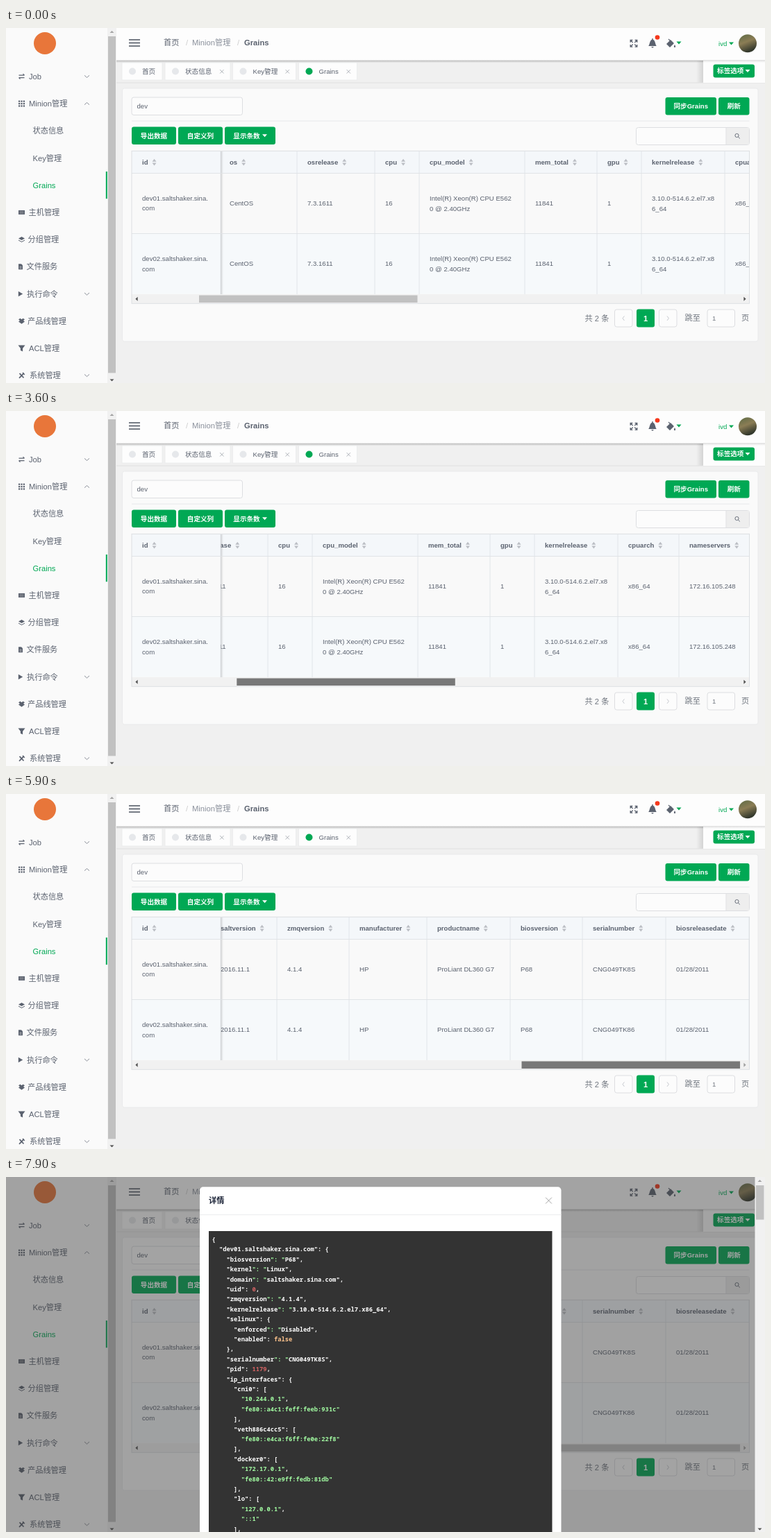
These frames come from a looping animation (1093x512 px, 8 s). An HTML page:

```html
<!DOCTYPE html>
<html lang="zh-CN">
<head>
<meta charset="utf-8">
<title>Grains</title>
<style>
html, body { margin: 0; width: 100%; height: 100%; overflow: hidden; background: #f0f0f0; }
svg { display: block; width: 1093px; height: 512px; }
text { font-family: "Liberation Sans", "Noto Sans CJK SC", "Noto Sans CJK", sans-serif; white-space: pre; }
.mono { font-family: "Noto Sans Mono", "DejaVu Sans Mono", monospace; font-size: 8.78px; font-weight: 600; }
</style>
</head>
<body>
<svg id="stage" viewBox="0 0 1093 512" xmlns="http://www.w3.org/2000/svg"></svg>
<script>
const GREEN = '#00a854', INK = '#5b626f', LINE = '#dddee1', DIM = '#bbbec4';
const LOOP = 8000, STEP = 100;
const stage = document.getElementById('stage');

const rect = (x, y, w, h, fill, more = '') =>
  `<rect x="${x}" y="${y}" width="${w}" height="${h}" fill="${fill}" ${more}/>`;
const disc = (x, y, r, fill) => `<circle cx="${x}" cy="${y}" r="${r}" fill="${fill}"/>`;
const fill = (d, color) => `<path d="${d}" fill="${color}"/>`;
const line = (d, color, w = 1) => `<path d="${d}" fill="none" stroke="${color}" stroke-width="${w}"/>`;
// y is the middle of the line of text
const text = (x, y, s, size = 9.6, color = INK, more = '') =>
  `<text x="${x}" y="${y + size * 0.36}" font-size="${size}" fill="${color}" ${more}>${s}</text>`;
const group = (body, more = '') => `<g ${more}>${body}</g>`;
const at = (x, y, body) => group(body, `transform="translate(${x} ${y})"`);
const cross = (x, y, r, color) =>
  line(`M${x - r} ${y - r}l${2 * r} ${2 * r}m0 ${-2 * r}l${-2 * r} ${2 * r}`, color, 0.9);
const caret = (x, y, color) => fill(`M${x - 3.5} ${y - 2}h7l-3.5 4z`, color);
const framed = (x, y, w, h, color = '#fcfcfc') => rect(x, y, w, h, color, `rx="3" stroke="${LINE}"`);

function button(x, y, w, h, label, drop) {
  const mid = x + w / 2 - (drop ? 5 : 0);
  return rect(x, y, w, h, GREEN, 'rx="3"') +
    text(mid, y + h / 2, label, 9.6, '#fff', 'text-anchor="middle" font-weight="600"') +
    (drop ? caret(x + w - 16 + drop, y + h / 2, '#fff') : '');
}

function arrow(x, y, dir, color = '#505050') {
  const turn = { up: 0, right: 90, down: 180, left: 270 }[dir];
  return `<path d="M-3 1.6h6l-3-3.2z" fill="${color}" transform="translate(${x} ${y}) rotate(${turn})"/>`;
}

// ---- sidebar ----
const icons = {
  job: line('M-4-1.8h8m-2-2l2 2M4 1.8h-8m2 2l-2-2', INK, 1.2),
  grid: [-3.4, 0, 3.4].map(x => [-3.4, 0, 3.4].map(y => rect(x - 1.1, y - 1.1, 2.2, 2.2, INK)).join('')).join(''),
  host: rect(-4.5, -3, 9, 6, INK) + line('M-3-1h6M-3 1h6', '#aaa', 0.7),
  stack: fill('M-4.5-1.5L0-4 4.5-1.5 0 1zM-4.5 .5L0 3 4.5 .5V1.4L0 4-4.5 1.4z', INK),
  file: fill('M-3-4h4l2 2v6h-6z', INK) + line('M-1.5 0h3M-1.5 2h3', '#ddd', 0.7),
  play: fill('M-3.2-3.8L3.2 0l-6.4 3.8z', INK),
  box: fill('M-4.5-2.5L-2-4 0-2.5 2-4 4.5-2.5 2.5-.8 4.5 .8 0 4-4.5 .8-2.5-.8z', INK),
  funnel: fill('M-5-4.5H5L1.6 0v4.5L-1.6 3V0z', INK),
  tools: line('M-3.5 3.8L3.2-3.2M-3-3l6 6.4', INK, 1.7) + line('M1.5-4l2.8 2.8', INK, 1.4)
};
const menu = [
  ['job', 'Job', 33, 'down'], ['grid', 'Minion管理', 33, 'up'],
  ['', '状态信息', 38.5], ['', 'Key管理', 38.5], ['', 'Grains', 38.5],
  ['host', '主机管理', 32.5], ['stack', '分组管理', 31.5], ['file', '文件服务', 29.5],
  ['play', '执行命令', 30, 'down'], ['box', '产品线管理', 31], ['funnel', 'ACL管理', 33],
  ['tools', '系统管理', 34, 'down']
];

function sidebar() {
  let s = rect(0, 0, 146, 512, '#fafafa') + disc(56, 22, 16, '#e8763a');
  menu.forEach(([icon, label, x, fold], i) => {
    const y = 69.9 + 39.2 * i;
    if (icon) s += at(icon === 'play' || icon === 'file' ? 21 : 22.5, y, icons[icon]);
    s += text(x, y, label, 11.2, i === 4 ? GREEN : INK);
    if (fold) {
      const d = fold === 'down' ? 1.6 : -1.6;
      s += line(`M113 ${y - d}l3.5 ${2 * d}l3.5 ${-2 * d}`, '#7d838d', 0.9);
    }
  });
  return s + rect(143.8, 207, 2, 39.2, GREEN) + rect(146, 0, 13, 512, '#f1f1f1') +
    rect(147, 12, 11, 485.5, '#c1c1c1') + arrow(152.5, 5.5, 'up', '#a3a3a3') + arrow(152.5, 508, 'down');
}

// ---- top bar and tabs ----
function header() {
  const corner = (a, b) => `M${a * 1.2} ${b * 1.2}L${a * 4} ${b * 4}M${a * 1.6} ${b * 4.8}H${a * 4.8}V${b * 1.6}`;
  const expand = [[-1, -1], [1, -1], [-1, 1], [1, 1]].map(p => corner(...p)).join('');
  return rect(159, 46, 934, 4, 'url(#drop)') + rect(159, 0, 934, 46.5, '#fdfdfd') +
    line('M177 17h16M177 21.5h16M177 26h16', '#4a515e', 1.5) +
    text(227, 21, '首页', 11.2) + text(259, 21, '/', 11.2, '#ccc') +
    text(268, 21, 'Minion管理', 11.2, '#8a909b') + text(333, 21, '/', 11.2, '#ccc') +
    text(343, 21, 'Grains', 11.2, INK, 'font-weight="700"') +
    at(904, 22.3, line(expand, INK, 1.3)) +
    at(931, 22, fill('M-6 4C-3.5 2-4.5-5 0-5.6 4.5-5 3.5 2 6 4zM-1.8 5h3.6Q0 8-1.8 5zM-.7-7h1.4v2h-1.4z', INK)) +
    disc(938, 13.5, 3.3, '#f5381c') +
    at(957, 22, fill('M-6 1L0-5 5 0-1 6zM6 2q2.4 4 0 4t0-4z', INK) + line('M-3-6l4 4', INK, 1.1)) +
    caret(969, 21.5, GREEN) + text(1026, 22.5, 'ivd', 9.6, GREEN) + caret(1044.5, 22.5, GREEN) +
    disc(1068, 22.3, 13, 'url(#photo)');
}

function tabs() {
  const list = [['首页', 167, 58], ['状态信息', 229, 94], ['Key管理', 326.5, 91], ['Grains', 421.5, 84]];
  let s = rect(159, 47, 934, 32, '#f0f0f0') + rect(159, 46.5, 934, 4, 'url(#drop)') + rect(159, 78.5, 934, 1, '#e2e2e2');
  list.forEach(([label, x, w], i) => {
    s += rect(x, 50, w, 25, '#fdfdfd', 'stroke="#e9eaec" stroke-width=".8"') +
      disc(x + 15, 62.5, 5, i === 3 ? GREEN : '#e6e8eb') + text(x + 29, 62.8, label);
    if (i) s += cross(x + w - 12.2, 62.8, 2.7, '#a9adb4');
  });
  return s + rect(994, 47, 10, 31.5, 'url(#side)') + rect(1004, 47, 89, 32, '#fdfdfd') +
    button(1018.5, 52.5, 59.5, 19, '标签选项', 6);
}

// ---- card ----
function card() {
  return rect(167.5, 87, 915.5, 365, '#fafafa', 'rx="3" stroke="#e6e7e9" stroke-width=".8"') +
    framed(181, 100, 159.5, 25.5) + text(188.5, 113, 'dev') +
    button(949.5, 100, 73.5, 25.5, '同步Grains') + button(1026, 100, 44.5, 25.5, '刷新') +
    rect(181, 133.6, 889.5, 0.9, '#e6e7ea') +
    button(181, 142.5, 64, 25.5, '导出数据') + button(248, 142.5, 64, 25.5, '自定义列') +
    button(315, 142.5, 73, 25.5, '显示条数', 0.5) +
    framed(907.5, 143.5, 163, 25) + rect(1037, 144, 33, 24, '#eee') + rect(1036.5, 144, 0.8, 24, LINE) +
    `<circle cx="1052.5" cy="155" r="2.6" fill="none" stroke="${INK}" stroke-width=".9"/>` +
    line('M1054.4 157l2.4 2.4', INK, 1);
}

function pager() {
  const nav = (x, d) => framed(x, 406, 25.5, 25) +
    line(`M${x + 12.7 + d} 415.5l${-2 * d} 3.2l${2 * d} 3.2`, '#c5c8ce');
  return text(833.5, 419, '共 2 条', 11.2, '#70767f') + nav(876.5, 1.2) + nav(940.5, -1.2) +
    rect(908, 405.5, 26, 26, GREEN, 'rx="3"') +
    text(921, 418.7, '1', 11.2, '#fff', 'text-anchor="middle" font-weight="700"') +
    text(977.5, 418, '跳至', 11.2, '#70767f') + framed(1010, 406, 39.5, 25) +
    text(1017, 418.7, '1', 9.6, '#70767f') + text(1059, 418, '页', 11.2, '#70767f');
}

// ---- table ----
const locale = 'defaultencoding : UTF-8|defaultlanguage : en_US|detectedencoding : UTF-8';
const columns = [
  ['os', 112, 'CentOS'], ['osrelease', 112, '7.3.1611'], ['cpu', 64, '16'],
  ['cpu_model', 152, 'Intel(R) Xeon(R) CPU E562|0 @ 2.40GHz'], ['mem_total', 104, '11841'], ['gpu', 64, '1'],
  ['kernelrelease', 120, '3.10.0-514.6.2.el7.x8|6_64'], ['cpuarch', 88, 'x86_64'],
  ['nameservers', 104, '172.16.105.248'], ['selinux', 116, 'enabled : false|enforced : Disabled'],
  ['locale_info', 152, locale], ['pythonversion', 112, '2.7.5.final.0'], ['saltversion', 96, '2016.11.1'],
  ['zmqversion', 104, '4.1.4'], ['manufacturer', 112, 'HP'], ['productname', 120, 'ProLiant DL360 G7'],
  ['biosversion', 104, 'P68'], ['serialnumber', 120, 'CNG049TK8S', 'CNG049TK86'], ['biosreleasedate', 120, '01/28/2011']
];

const cell = (x, y, value) => {
  const rows = value.split('|');
  return rows.map((s, i) => text(x, y + (i - (rows.length - 1) / 2) * 14.4, s)).join('');
};
const head = (x, label) => text(x, 193.6, label, 9.6, INK, 'font-weight="700" class="head"');

function table() {
  let x = 307, cells = '';
  for (const [label, w, a, b = a] of columns) {
    cells += head(x + 15, label) + cell(x + 15, 253, a) + cell(x + 15, 340, b);
    x += w;
    cells += rect(x - 0.4, 178, 0.9, 206, '#dfe3e8');
  }
  const fixed = head(196, 'id') + cell(196, 252.8, 'dev01.saltshaker.sina.|com') + cell(196, 340, 'dev02.saltshaker.sina.|com');
  return rect(181, 177, 889.5, 207, '#fafafa') + rect(181, 177.5, 889.5, 32, '#f4f7fa') +
    rect(181, 209.5, 889.5, 87, '#f9f9f9', 'id="row"') + rect(181, 296.5, 889.5, 87, '#f6f9fb') +
    group(group(cells, 'id="cells"'), 'clip-path="url(#view)"') + fixed +
    rect(309, 178, 4, 206, 'url(#edge)') + rect(308.8, 178, 0.9, 206, '#d3d6da') +
    [209, 296].map(y => rect(181, y, 889.5, 0.9, '#dfe2e6')).join('') +
    rect(181, 384, 889.5, 13, '#f1f1f1') + rect(278, 385.5, 314.5, 10.5, '#c1c1c1', 'id="thumb"') +
    arrow(188, 390.8, 'left') + group(arrow(1064, 390.8, 'right'), 'id="next"') +
    rect(181, 177.3, 889.5, 220, 'none', 'stroke="#d9dce0" stroke-width=".9"');
}

// ---- dialog ----
const json = `{
  "dev01.saltshaker.sina.com": {
    "biosversion": "P68",
    "kernel": "Linux",
    "domain": "saltshaker.sina.com",
    "uid": 0,
    "zmqversion": "4.1.4",
    "kernelrelease": "3.10.0-514.6.2.el7.x86_64",
    "selinux": {
      "enforced": "Disabled",
      "enabled": false
    },
    "serialnumber": "CNG049TK8S",
    "pid": 1179,
    "ip_interfaces": {
      "cni0": [
        "10.244.0.1",
        "fe80::a4c1:feff:feeb:931c"
      ],
      "veth886c4cc5": [
        "fe80::e4ca:f6ff:fe0e:22f8"
      ],
      "docker0": [
        "172.17.0.1",
        "fe80::42:e9ff:fedb:81db"
      ],
      "lo": [
        "127.0.0.1",
        "::1"
      ],`;
const paint = s => s.replace(/"[^"]*"(?!:)|\b\d+(?=,$)|false/g, m => {
  const color = m[0] === '"' ? '#a2fca2' : m === 'false' ? '#fcc28c' : '#d36363';
  return `<tspan fill="${color}">${m}</tspan>`;
});

function dialog() {
  const code = json.split('\n').map((s, i) => {
    const body = s.trimStart();
    return `<text class="mono" x="${296.5 + (s.length - body.length) * 5.27}" y="${93 + i * 14.4}" fill="#fff">${paint(body)}</text>`;
  }).join('');
  return rect(279, 14.3, 520.5, 5230, '#fff', 'rx="5"') + rect(279, 54, 520.5, 0.9, '#e9eaec') +
    text(292, 34, '详情', 11.2, '#1c2438', 'font-weight="700"') + cross(781.5, 34, 4.4, '#999') +
    rect(292, 78, 494.5, 5150, '#333') + code;
}

const pageBar = rect(1078.5, 0, 14.5, 512, '#f1f1f1') + rect(1080, 12, 11.5, 49.5, '#c1c1c1') +
  arrow(1085.5, 5.5, 'up', '#a3a3a3') + arrow(1085.5, 508, 'down');

const fade = (id, dir, a, b) => `<linearGradient id="${id}" x2="${dir === 'x' ? 1 : 0}" y2="${dir === 'x' ? 0 : 1}">
  <stop stop-color="#000" stop-opacity="${a}"/><stop offset="1" stop-color="#000" stop-opacity="${b}"/></linearGradient>`;

stage.innerHTML = `<defs>${fade('drop', 'y', 0.13, 0)}${fade('side', 'x', 0, 0.12)}${fade('edge', 'x', 0.16, 0)}
  <linearGradient id="photo" x2=".4" y2="1"><stop stop-color="#5c6a45"/><stop offset=".5" stop-color="#8b7d55"/>
  <stop offset="1" stop-color="#33382c"/></linearGradient>
  <clipPath id="view">${rect(309, 177, 761, 207, '#000')}</clipPath></defs>` +
  rect(0, 0, 1093, 512, '#f0f0f0') + tabs() + header() + card() + table() + pager() + sidebar() +
  rect(0, 0, 1093, 512, '#373737', 'id="mask"') + group(dialog(), 'id="dialog"') + group(pageBar, 'id="bar"');

// sort marks sit right after each heading
stage.querySelectorAll('.head').forEach(h => {
  const x = +h.getAttribute('x') + h.getComputedTextLength() + 9;
  h.insertAdjacentHTML('afterend', fill(`M${x - 3} 192.7h6l-3-4zM${x - 3} 194.5h6l-3 4z`, DIM));
});

// ---- motion ----
// time, scroll, speed per step
const drag = [[2900, 0, 5], [3000, 14, 18], [4200, 389, 50], [4900, 899, 65], [5900, 1313, 12]];

function scrollAt(t) {
  if (t <= drag[0][0]) return 0;
  for (let i = 1; i < drag.length; i++) {
    const [t0, a, va] = drag[i - 1], [t1, b, vb] = drag[i];
    if (t > t1) continue;
    const u = (t - t0) / (t1 - t0), n = (t1 - t0) / STEP, w = 1 - u;
    return w * w * (1 + 2 * u) * a + u * w * w * n * va + u * u * (3 - 2 * u) * b - u * u * w * n * vb;
  }
  return 1313;
}

function thumbColor(t) {
  if (t >= 2300 && t < 6300) return '#787878';
  return t >= 1800 && t < 6600 ? '#a8a8a8' : '#c1c1c1';
}

const el = id => document.getElementById(id);
const set = (id, attrs) => Object.entries(attrs).forEach(([k, v]) => el(id).setAttribute(k, v));

function draw(ms) {
  const t = Math.floor((ms % LOOP) / STEP) * STEP;
  const scroll = scrollAt(t), open = t >= 7700;
  const grow = t >= 7900 ? 1 : t >= 7800 ? 0.8 : 0.35;
  set('cells', { transform: `translate(${-Math.round(scroll)} 0)` });
  set('thumb', { x: 278 + scroll * 0.3538, fill: thumbColor(t) });
  set('next', { opacity: scroll >= 1313 ? 0.5 : 1 });
  set('row', { fill: open && t < 7900 ? '#ebf7ff' : '#f9f9f9' });
  const shown = open ? 'visible' : 'hidden';
  set('mask', { visibility: shown, opacity: 0.16 + (grow - 0.35) * 0.45 });
  set('dialog', {
    visibility: shown, opacity: grow,
    transform: `translate(539 2629) scale(${0.9 + grow * 0.1}) translate(-539 -2629)`
  });
  set('bar', { visibility: shown });
}

const start = performance.now();
function tick() {
  draw(performance.now() - start);
  requestAnimationFrame(tick);
}
tick();
</script>
</body>
</html>
```
